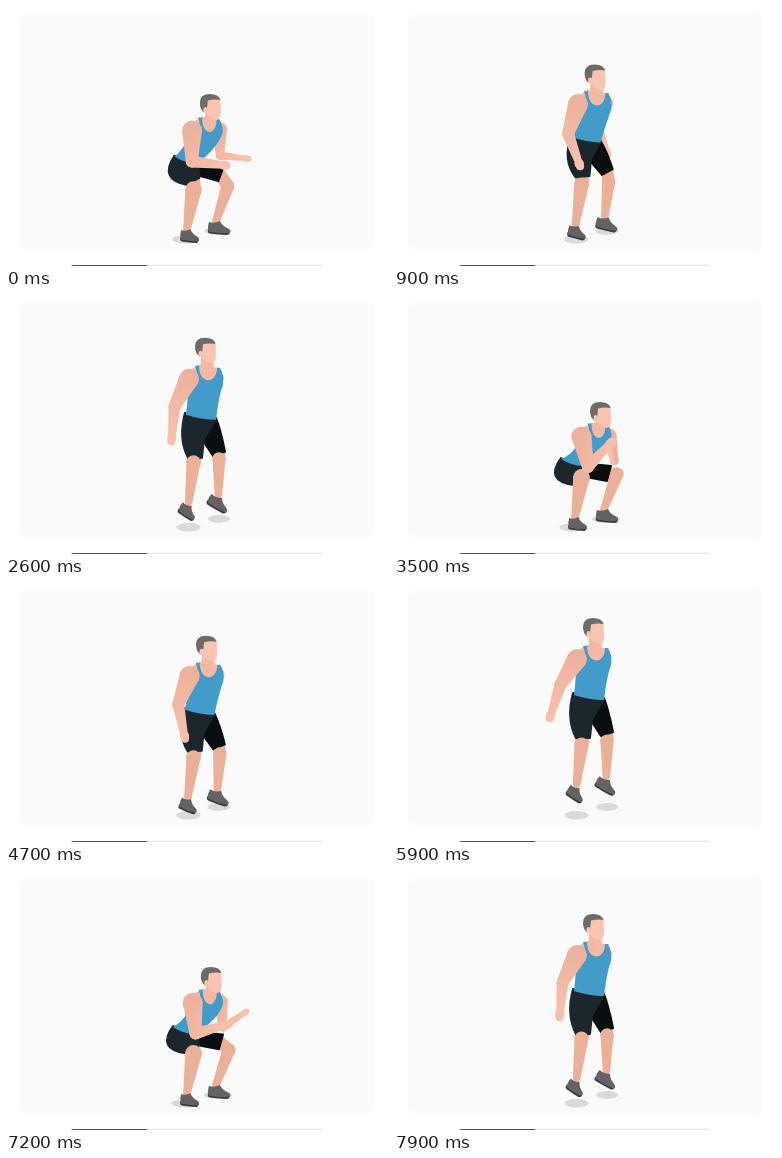
Write an HTML page with a canvas that moves like this. It is 382 by 260 pixels and loops after 8000 ms.

```html
<!DOCTYPE html>
<html lang="en">
<head>
<meta charset="utf-8">
<title>Jump squat</title>
<style>
html, body { margin: 0; width: 100%; height: 100%; overflow: hidden; background: #fff; }
canvas { display: block; width: 382px; height: 260px; }
</style>
</head>
<body>
<canvas id="stage"></canvas>
<script>
const W = 382, H = 260, LOOP = 8000, STEP = 100, CYCLE = 1625, FIRST = 600;
const LEG = '#ebb09a', NECK = '#f2b9a4', FACE = '#fac5b0', SHIRT = '#429bc8';
const canvas = document.getElementById('stage');
const dpr = window.devicePixelRatio || 1;
canvas.width = W * dpr;
canvas.height = H * dpr;
const ctx = canvas.getContext('2d');
ctx.scale(dpr, dpr);

// Time and height of the top of the head; the whole pose follows from it.
const JUMP = [[0, 108], [100, 97], [425, 36], [612, 16], [800, 44], [1000, 84], [1200, 108]];

const mix = (a, b, u) => a + (b - a) * u;
const clamp = u => Math.max(0, Math.min(1, u));
const smooth = u => u * u * (3 - 2 * u);

// Monotone cubic through the key points.
function headTop(t) {
  const n = JUMP.length - 1;
  if (t >= JUMP[n][0]) return JUMP[n][1];
  const slope = k => (JUMP[k + 1][1] - JUMP[k][1]) / (JUMP[k + 1][0] - JUMP[k][0]);
  const tangent = k => {
    if (k === 0 || k === n) return 0;
    const a = slope(k - 1), b = slope(k);
    return a * b <= 0 ? 0 : 2 * a * b / (a + b);
  };
  const i = JUMP.findIndex((p, k) => t < JUMP[k + 1][0]);
  const [t0, y0] = JUMP[i], [t1, y1] = JUMP[i + 1];
  const d = t1 - t0, u = (t - t0) / d, v = 1 - u;
  return mix(y0, y1, smooth(u)) + d * u * v * (v * tangent(i) - u * tangent(i + 1));
}

function disc(x, y, rx, ry, color) {
  ctx.fillStyle = color;
  ctx.beginPath();
  ctx.ellipse(x, y, rx, ry, 0, 0, Math.PI * 2);
  ctx.fill();
}

function poly(points, color) {
  ctx.fillStyle = color;
  ctx.beginPath();
  points.forEach(p => ctx.lineTo(p[0], p[1]));
  ctx.fill();
}

// Tapered capsule
function limb(a, b, ra, rb, color) {
  const ang = Math.atan2(b[1] - a[1], b[0] - a[0]);
  const nx = -Math.sin(ang), ny = Math.cos(ang);
  disc(a[0], a[1], ra, ra, color);
  disc(b[0], b[1], rb, rb, color);
  poly([[a[0] + nx * ra, a[1] + ny * ra], [b[0] + nx * rb, b[1] + ny * rb],
    [b[0] - nx * rb, b[1] - ny * rb], [a[0] - nx * ra, a[1] - ny * ra]], color);
}

// Angles in degrees, 0 hanging down and 90 reaching forward.
function reach([x, y], length, deg) {
  const a = deg * Math.PI / 180;
  return [x + Math.sin(a) * length, y + Math.cos(a) * length];
}

function arm(shoulder, upper, lower, upperLength, lowerLength, size) {
  const elbow = reach(shoulder, upperLength, upper);
  const hand = reach(elbow, lowerLength, lower);
  const tip = reach(hand, 3, lower);
  const skin = ctx.createLinearGradient(...shoulder, ...hand);
  skin.addColorStop(0, '#edb29d');
  skin.addColorStop(1, '#f7c1ad');
  limb(shoulder, elbow, 10 * size, 6 * size, skin);
  limb(elbow, hand, 6 * size, 3.6 * size, skin);
  limb(hand, tip, 4.6 * size, 4 * size, skin);
}

function shoe(x, y, width, tilt) {
  ctx.save();
  ctx.translate(x, y);
  ctx.rotate(tilt);
  ctx.scale(width, 1);
  ctx.fillStyle = '#3b3b3f';
  ctx.fill(new Path2D('M-8 8 L13 10 Q15 13 11 14 L3 13.5 L-6 12.5 Q-9 12 -8 8Z'));
  ctx.fillStyle = '#646265';
  ctx.fill(new Path2D('M-7 1 Q-2 3 4 0 Q6 5 12 7.5 Q15 9 14 12 L3 12 L-7 10.5 Q-9 6 -7 1Z'));
  ctx.restore();
}

function leg(knee, ankle, r, width, tilt) {
  limb(knee, ankle, r, 3.8, LEG);
  shoe(ankle[0], ankle[1] + 5 * tilt, width, tilt);
}

function head(x, y) {
  ctx.save();
  ctx.translate(x, y);
  ctx.fillStyle = FACE;
  ctx.fill(new Path2D('M-6 5 L9.5 4 L10 17 Q10 25 6 26 Q1 25.5 -2 22 L-6 17Z'));
  ctx.fillStyle = '#6d6a6a';
  ctx.fill(new Path2D('M-11 9 Q-11 0 -1 0 Q8 0 9.5 6 Q3 5 -3 6.5 L-4 16 L-6 19 Q-11 16 -11 9Z'));
  ctx.restore();
  disc(x - 5.5, y + 16, 2, 3, FACE);
}

function pants(x, y, c) {
  // Each point blends from standing to crouching, measured from the waist.
  const at = (sx, sy, cx, cy) => [x + mix(sx, cx, c), y + mix(sy, cy, c)];
  const shape = (color, start, hip, hem, rest) => {
    ctx.beginPath();
    ctx.moveTo(...start);
    ctx.quadraticCurveTo(...hip, ...hem);
    rest.forEach(p => ctx.lineTo(...p));
    ctx.closePath();
    ctx.fillStyle = ctx.strokeStyle = color;
    ctx.lineWidth = 2;
    ctx.lineJoin = 'round';
    ctx.fill();
    ctx.stroke();
  };
  return {
    nearHem: at(-6, 38, 9, 17),
    farHem: at(18, 35, 36, 11),
    near: () => shape('#1c262d', at(-16, -4, -11, -5), at(-23, 22, -28, 18), at(-13, 41, 2, 22),
      [at(1, 41, 15, 14), at(3, 22, 14, 8), at(15, 2, 10, 3)]),
    far: () => shape('#0b0e11', at(15, 1, 10, 2), at(20, 14, 24, 1), at(24, 35, 39, 3),
      [at(12, 39, 35, 18), at(1, 22, 14, 14), at(0, 0, 0, 0)])
  };
}

function shirt(sx, sy, wx, wy, c) {
  const right = sx + mix(33, 29, c);
  ctx.beginPath();
  ctx.moveTo(sx + 6, sy - 13);
  ctx.lineTo(sx + 10, sy - 13);
  ctx.bezierCurveTo(sx + 10, sy + 6, right - 5, sy + 6, right - 5, sy - 11);
  ctx.lineTo(right - 2, sy - 11);
  ctx.quadraticCurveTo(right + 2, sy - 4, right + 1, sy + mix(6, 2, c));
  ctx.quadraticCurveTo(right - 3, sy + 16, wx + mix(15, 11, c), wy + 3);
  ctx.quadraticCurveTo(wx, wy + 3, wx - mix(15, 11, c), wy - mix(2, 4, c));
  ctx.quadraticCurveTo(sx - mix(1, 10, c), sy + 18, sx - mix(1, 6, c), sy + 11);
  ctx.quadraticCurveTo(sx + 12, sy + 2, sx + 6, sy - 13);
  ctx.fillStyle = SHIRT;
  ctx.fill();
}

function athlete(t) {
  const top = headTop(t);
  const low = Math.max(0, top - 44);
  const c = smooth(clamp((top - 44) / 56));
  const lift = Math.max(0, 65 - top) * .72;
  const tilt = clamp(lift / 14) * .48;

  const hx = 200 + low * .11;
  const sx = 183 + low * .07, sy = top + 41 - low * .1;
  const wx = 195 - c * 17, wy = top + 79 - low * .28;
  const ankleY = 223 - lift, shift = tilt * 5;
  const knee = [187.5, ankleY - 39.5];
  const farKnee = [213 + c * 10, ankleY - 43];
  const upper = 12 - (108 - top) * .62;
  const lower = (top - 44) * 1.6 - 5 + low * low * .0095;
  const clasp = Math.max(0, top - 92) * 3.6;
  const farArm = () => arm([sx + 28, sy - 1], upper * .9, lower + clasp, 26, 26, .7);
  const shorts = pants(wx, wy, c);

  disc(182.5 - c * 3, 233.3, 12 + c * 2, 4.2, '#dadada');
  disc(213 - c, 225, 11 + c * 3, 3.9, '#dadada');

  if (c < .5) farArm();
  limb(shorts.farHem, farKnee, 6, 6.4, LEG);
  shorts.far();
  leg(farKnee, [210 + shift, ankleY - 8], 6.6, 1, tilt * .9);
  limb(shorts.nearHem, knee, 7, 7, LEG);
  shorts.near();
  leg(knee, [181 + shift * .7, ankleY], mix(7, 8.4, c), .84, tilt);
  if (c >= .5) farArm();

  limb([hx + 1, top + 20], [sx + 18, sy - 8], 6, 7, NECK);
  poly([[sx, sy - 8], [sx + 10, sy - 14], [sx + 28, sy - 11], [sx + 28, sy + 3], [sx + 4, sy + 6]], NECK);
  shirt(sx, sy, wx, wy, c);
  head(hx, top);
  arm([sx, sy], upper, lower, 31, 32, 1);
}

function bar(x, width, color) {
  ctx.fillStyle = color;
  ctx.beginPath();
  ctx.roundRect(x, 259, width, 8, 4);
  ctx.fill();
}

function draw(now) {
  const t = Math.floor((now % LOOP) / STEP) * STEP;
  ctx.fillStyle = '#fff';
  ctx.fillRect(0, 0, W, H);
  ctx.fillStyle = '#fafafa';
  ctx.beginPath();
  ctx.roundRect(14, 8, 354, 236, 9);
  ctx.fill();
  bar(64, 254, '#e3e5e8');
  bar(64, 79, '#29589a');
  athlete((t - FIRST + CYCLE) % CYCLE);
}

const start = performance.now();
function tick() {
  draw(performance.now() - start);
  requestAnimationFrame(tick);
}
tick();
</script>
</body>
</html>
```
